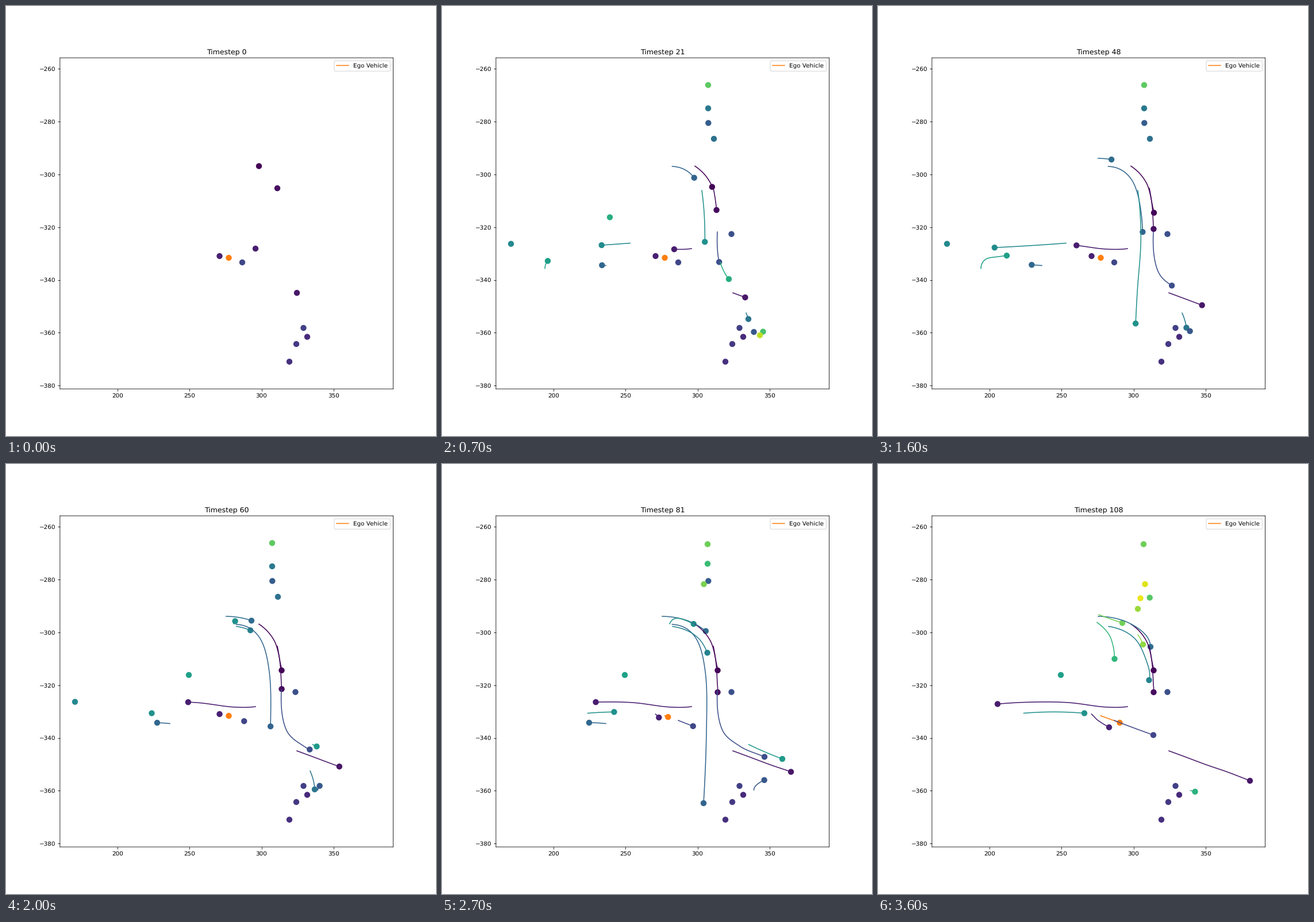
Recreate the animation shown at these times as a matplotlib script. Size 748 px wide and 748 px high, loop 3700 ms.

```python
import numpy as np
import matplotlib.pyplot as plt
from matplotlib.animation import FuncAnimation

SIZE, DPI = 748, 74.8
FRAMES, INTERVAL, STRIDE = 37, 100, 3
END = (FRAMES - 1) * STRIDE
EGO = "#ff7f0e"

# Unsnapped, unhinted drawing gives the soft look of a scaled-down plot
plt.rcParams.update({"path.snap": False, "text.hinting": "none"})
fig, ax = plt.subplots(figsize=(SIZE / DPI, SIZE / DPI), dpi=DPI)
fig.subplots_adjust(left=.1255, right=.9005, bottom=.1095, top=.8795)
ax.set_xlim(160.1, 391.4)
ax.set_ylim(-381.3, -255.8)
dots = ax.scatter([], [], s=100, linewidths=0, zorder=1)
to_data = ax.transData.inverted()
tracks = []


def spline(s, pts):
    """Catmull-Rom curve through evenly timed points, s from 0 to 1."""
    m = np.gradient(pts, axis=0, edge_order=min(2, len(pts) - 1))
    u = s * (len(pts) - 1)
    i = np.minimum(u.astype(int), len(pts) - 2)
    u = (u - i)[:, None]
    ease = u * u * (3 - 2 * u)
    return (pts[i] + (pts[i + 1] - pts[i]) * ease
            + m[i] * u * (1 - u) ** 2 - m[i + 1] * u * u * (1 - u))


def drive(color, first, last, *pts, go=None, stop=None):
    """Add a vehicle seen from `first` to `last`, moving between `go` and `stop`."""
    go = first if go is None else go
    stop = last if stop is None else stop
    t = np.arange(first, last + 1)
    pts = np.array(pts, float)
    if len(pts) > 1:
        path = spline(np.clip((t - go) / (stop - go), 0, 1), pts)
    else:
        path = np.repeat(pts, len(t), axis=0)
    path[:, 1] = SIZE - path[:, 1]
    rgba = plt.cm.viridis(color) if isinstance(color, float) else plt.matplotlib.colors.to_rgba(color)
    line, = ax.plot([], [], color=rgba, lw=1.5)
    tracks.append((line, rgba, first, last, to_data.transform(path)))
    return line


ego = drive(EGO, 0, END, (387.5, 438), (395.2, 440.8), (420.5, 450), go=60)

# Standing vehicles: (first, last) -> shade, x, y
parked = {
    (0, END): [(.19, 517.5, 560), (.12, 524, 575.5), (.165, 505, 588), (.14, 493, 618.7)],
    (3, END): [(.245, 503.5, 396.7)],
    (3, 63): [(.40, 463, 178), (.37, 473, 231), (.47, 120, 413.7)],
    (3, 84): [(.29, 463.3, 203.5)],
    (6, 39): [(.625, 292, 367.5)],
    (6, 21): [(.71, 558.5, 566.5)],
    (9, 18): [(.98, 554, 579)],
    (18, 63): [(.75, 463, 137.5)],
    (21, 39): [(.90, 553, 572.7)],
    (57, END): [(.57, 318, 367)],
    (63, 81): [(.80, 455.5, 209)],
    (81, END): [(.78, 462, 139.5)],
    (81, 99): [(.68, 462, 173.5)],
    (84, END): [(.74, 472.7, 232.5)],
    (84, 99): [(.92, 122, 414)],
    (99, END): [(.95, 464.5, 209), (.97, 456.5, 233.5), (.85, 452, 252)],
}
for (first, last), cars in parked.items():
    for shade, x, y in cars:
        drive(shade, first, last, (x, y))

# Through the bend, then south
drive(.005, 0, END, (440, 278.5), (467, 308), (478, 350), (479.5, 359), stop=54)
drive(.035, 0, END, (472, 317), (477, 349), (479, 383), (479.5, 389), (479.5, 397), stop=72)
drive(.32, 3, 81, (400.5, 279), (441, 302), (458.5, 366), (460, 465), (455, 590))
drive(.50, 3, 54, (452, 321), (457.3, 405), (451, 498), (447, 580))
drive(.35, 36, END, (383, 265), (427, 272.5), (462, 293.5), (474, 318))
drive(.44, 51, END, (401, 282.5), (446, 303), (468.5, 347), (471.5, 376))
drive(.50, 57, 99, (396, 278), (409, 268.2), (433, 276), (446, 284), (453, 295))
drive(.785, 87, END, (384, 262), (401.5, 268.5), (425, 276.5))
drive(.66, 84, END, (381, 275.5), (400, 294), (408.5, 314.5), (411.5, 339))
drive(.835, 102, END, (452, 297), (456.5, 304), (461, 314))

# Along the crossing road
drive(.08, 0, END, (434, 422), (393, 422.6), (331, 415), (267.5, 414.2), (208, 417.5))
drive(.48, 3, 54, (327, 412.5), (257, 417.3), (186, 421))
drive(.33, 6, 84, (285, 451.5), (268.5, 450.3), (255, 450))
drive(.56, 9, 57, (179, 456.5), (187.5, 440.5), (211, 435.8), (243, 432.5))
drive(.51, 60, END, (253.5, 433.5), (306, 431.3), (359, 433.5))
drive(.09, 0, END, (371.5, 435), (375.5, 439), (383.3, 446.5), (402, 458), go=60)
drive(.21, 0, END, (411, 446), (438, 456.5), (479, 471.5), go=56)

# Towards the south-east exit
drive(.06, 0, END, (506, 499), (534.5, 509.5), (572, 523.5), (607, 535.5), (647, 551))
drive(.24, 3, 102, (479, 393), (486.5, 460), (517.5, 490.5), (555, 507), (596, 522))
drive(.62, 3, 39, (484, 446), (499, 475), (520, 489))
drive(.39, 3, 60, (529, 534), (534.7, 550.5), (537, 566))
drive(.86, 9, 18, (532, 552), (536, 568))
drive(.27, 18, 102, (542.5, 567), (547.5, 558), (562.5, 549), (584, 543), go=45)
drive(.54, 57, 81, (533.5, 488), (562, 501), (592, 513))
drive(.64, 87, END, (543.5, 568), (551.5, 570))

title = ax.set_title("")
ax.legend([ego], ["Ego Vehicle"], loc="upper right")


def update(frame):
    step = frame * STRIDE
    title.set_text(f"Timestep {step}")
    spots, colors = [], []
    for line, rgba, first, last, path in tracks:
        n = step - first + 1 if first <= step <= last else 0
        line.set_data(*path[:n].T)
        if n:
            spots.append(path[n - 1])
            colors.append(rgba)
    dots.set_offsets(spots)
    dots.set_facecolors(colors)


anim = FuncAnimation(fig, update, frames=FRAMES, interval=INTERVAL,
                     repeat=True, repeat_delay=0)
plt.show()
```
